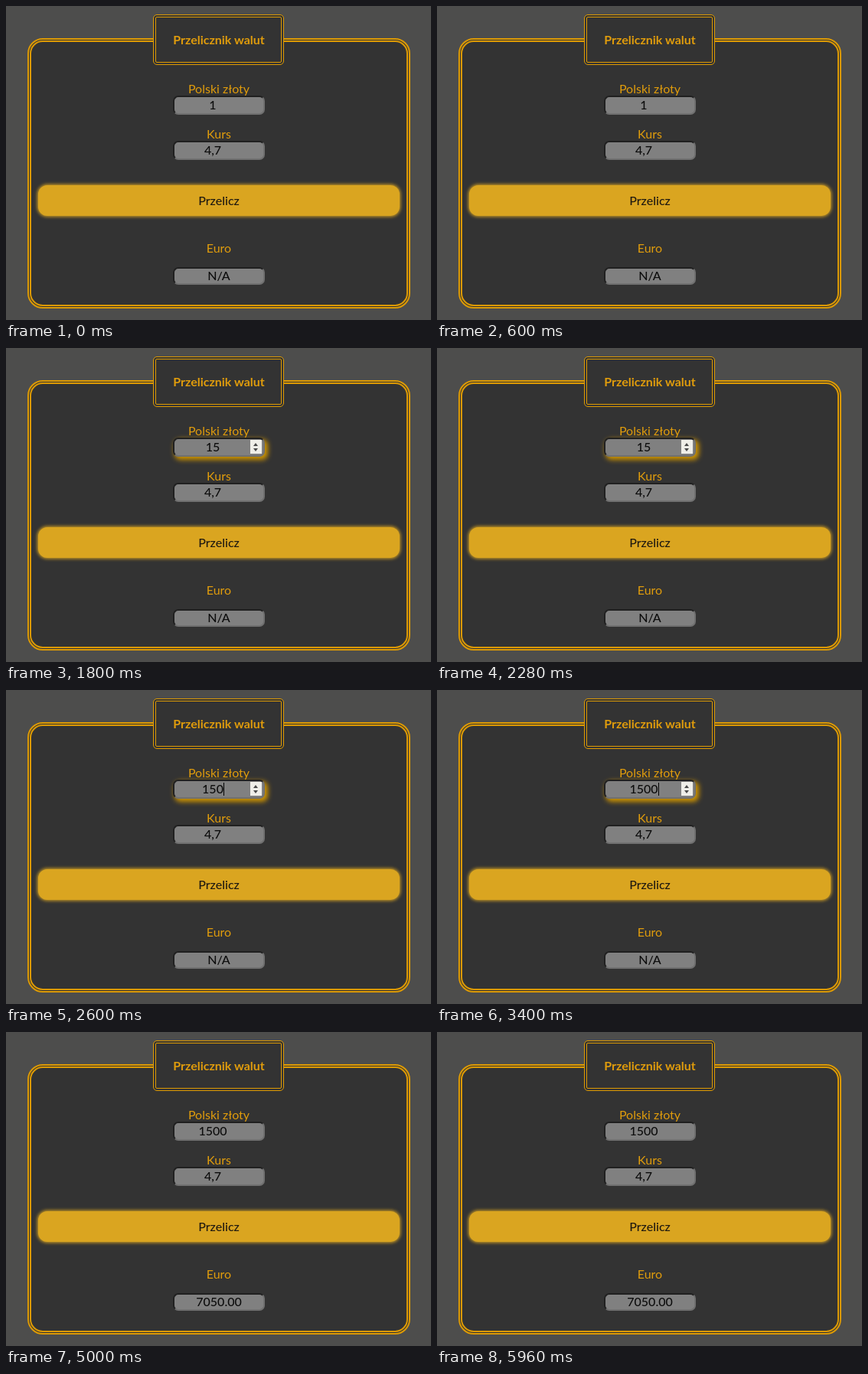
An HTML page for the animation above (6.6 s loop, 555x410 px).

```html
<!DOCTYPE html>
<html lang="pl">
<head>
<meta charset="utf-8">
<title>Przelicznik walut</title>
<style>
  html, body { margin: 0; width: 100%; height: 100%; overflow: hidden; background: #4d4d4c; }
  body { position: relative; font: 16px/20px Lato, sans-serif; color: #e09c0c; }
  div, span, i { position: absolute; box-sizing: border-box; }
  .panel { left: 28px; top: 42px; width: 500px; height: 353px; background: #333;
    border: 5px double #dd9a04; border-radius: 20px; }
  .title { left: 192px; top: 11px; width: 171px; height: 66px; background: #333;
    border: 4px double #dd9a04; border-radius: 5px; }
  .text { left: 178px; width: 200px; text-align: center; white-space: pre; }
  .bold { font-weight: 700; }
  .dark { color: #0c0c0c; font-weight: 500; }
  .number { left: 170px; }
  .box { left: 218px; width: 120px; height: 25px; background: #808080;
    border: 2px solid; border-color: #202020 #707070 #707070 #202020; border-radius: 7px; }
  .focus { box-shadow: 3px 3px 6px 1px #cf9500; }
  .button { left: 42px; top: 234px; width: 472px; height: 40px; border-radius: 12px;
    background: var(--fill); box-shadow: 0 0 4px 1px var(--fill); }
  .spin { left: 319px; top: 120px; width: 15px; height: 18px; background: #efeee8; }
  .spin i { left: 4px; border: solid transparent; border-width: 0 3.5px; }
  .spin .up { top: 4px; border-bottom: 4px solid #494949; }
  .spin .down { top: 11px; border-top: 4px solid #494949; }
  .caret { top: 121px; width: 1px; height: 17px; background: #000; }
</style>
</head>
<body>
<div class="panel"></div>
<div class="title"></div>
<span class="text bold" style="top:34px">Przelicznik walut</span>

<div class="box" id="field" style="top:117px"></div>
<span class="text" style="top:98px">Polski złoty</span>
<span class="text dark number" id="amount" style="top:119px">1</span>
<div class="spin" id="spin"><i class="up"></i><i class="down"></i></div>
<div class="caret" id="caret"></div>

<span class="text" style="top:157px">Kurs</span>
<div class="box" style="top:176px"></div>
<span class="text dark number" style="top:178px">4,7</span>

<div class="button" id="button"></div>
<span class="text dark bold" style="top:244px;color:#201a10">Przelicz</span>

<span class="text" style="top:306px">Euro</span>
<div class="box" style="top:341px;height:23px"></div>
<span class="text dark" id="result" style="top:342px">N/A</span>

<script>
  const LOOP = 6600;
  const steps = [
    { at: 0, amount: '1' },
    { at: 1000, amount: '1', focus: true, caret: 275 },
    { at: 1800, amount: '15', focus: true },
    { at: 2600, amount: '150', focus: true, caret: 284 },
    { at: 3400, amount: '1500', focus: true, caret: 289 },
    { at: 4200, amount: '1500', pressed: true },
    { at: 5000, amount: '1500', result: '7050.00' }
  ];
  const el = id => document.getElementById(id);
  const show = (id, on) => { el(id).style.display = on ? 'block' : 'none'; };
  let current;

  function render(step) {
    el('amount').textContent = step.amount;
    el('result').textContent = step.result || 'N/A';
    el('field').classList.toggle('focus', !!step.focus);
    show('spin', step.focus);
    show('caret', step.caret);
    el('caret').style.left = (step.caret || 0) + 'px';
    el('button').style.setProperty('--fill', step.pressed ? '#d29500' : '#daa520');
  }

  const start = performance.now();
  function tick() {
    const t = Math.max(0, performance.now() - start) % LOOP;
    const step = steps.filter(s => s.at <= t).pop();
    if (step !== current) render(current = step);
    requestAnimationFrame(tick);
  }
  tick();
</script>
</body>
</html>
```
